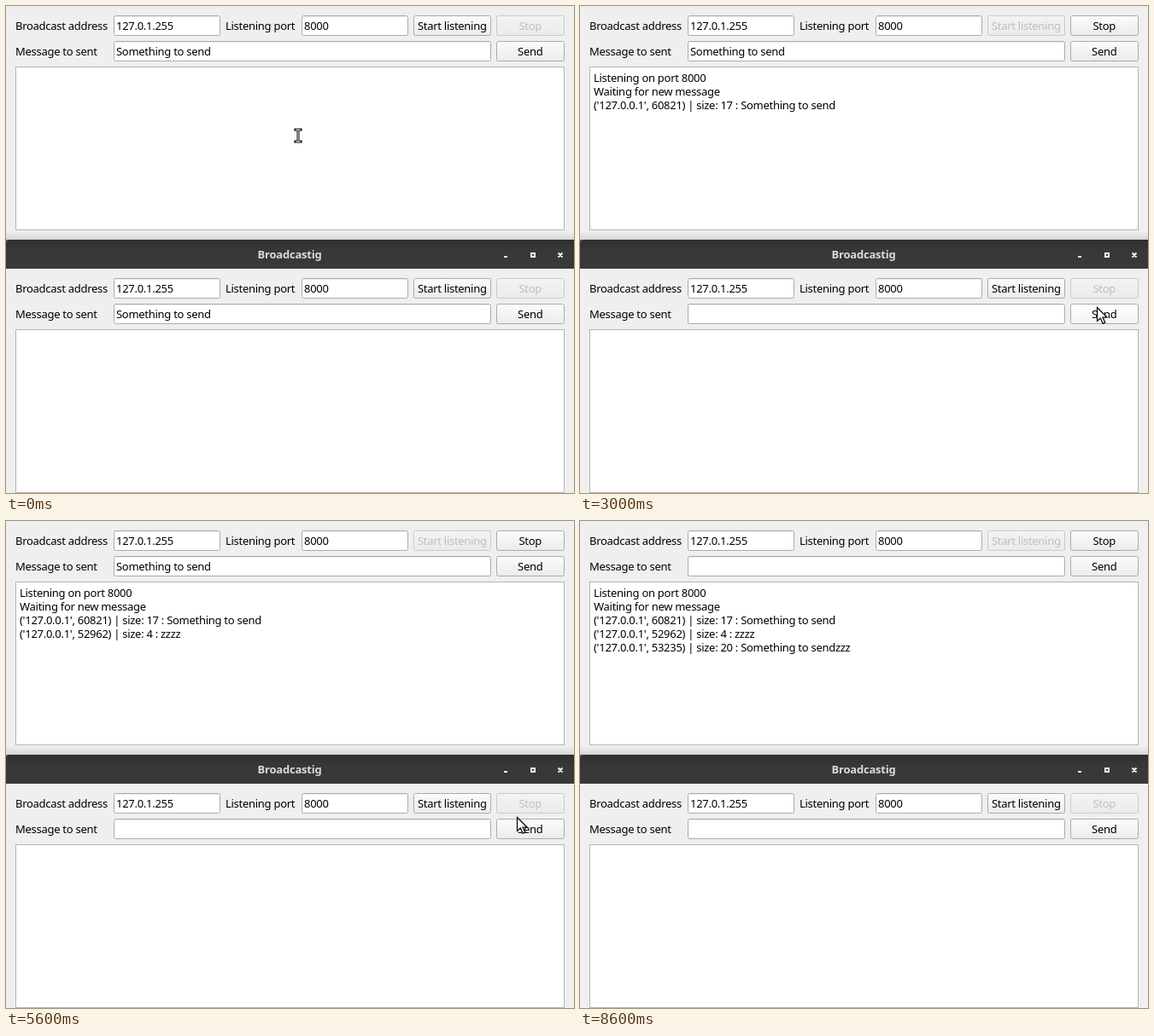
Animation of 665 by 571 pixels, one loop 8800 ms. Source, as an HTML page:

```html
<!DOCTYPE html>
<html lang="en">
<head>
<meta charset="utf-8">
<title>Broadcastig</title>
<style>
html, body { margin: 0; width: 100%; height: 100%; overflow: hidden; background: #efefef; }
svg { display: block; }
text { font: 13px "Noto Sans", "Open Sans", sans-serif; letter-spacing: -.28px; fill: #000; }
.mid { text-anchor: middle; }
.box { fill: #fff; stroke: #ababab; }
.area { stroke: #b5b5b5; }
.inset { stroke: #ececec; }
.focus .box { stroke: #266f9e; }
.focus .inset { stroke: #d4e6f1; }
.caret { visibility: hidden; }
.focus .caret { visibility: visible; }
.button rect { fill: url(#face); stroke: #ababab; }
.hover rect { fill: url(#light); }
.down rect { fill: #d9d9d9; }
.off rect { fill: url(#dull); stroke: #cbcbcb; }
.off text { fill: #bebebe; }
.title { font-weight: 600; fill: #dadada; letter-spacing: -.2px; }
.idle .title { fill: #d0d4d5; }
.idle .shade { opacity: .6; }
</style>
</head>
<body>
<svg width="665" height="571" viewBox="0 0 665 571">
  <defs>
    <linearGradient id="face" x2="0" y2="1">
      <stop stop-color="#fcfcfc"/><stop offset="1" stop-color="#ebebeb"/>
    </linearGradient>
    <linearGradient id="light" x2="0" y2="1">
      <stop stop-color="#fff"/><stop offset="1" stop-color="#f3f3f3"/>
    </linearGradient>
    <linearGradient id="dull" x2="0" y2="1">
      <stop stop-color="#f3f3f3"/><stop offset="1" stop-color="#ebebeb"/>
    </linearGradient>
    <linearGradient id="fade" x2="0" y2="1">
      <stop stop-color="#000" stop-opacity="0"/><stop offset="1" stop-color="#000" stop-opacity=".12"/>
    </linearGradient>
    <linearGradient id="metal" x2="0" y2="1">
      <stop stop-color="#303030"/><stop offset=".4" stop-color="#383838"/>
    </linearGradient>
  </defs>
  <rect width="665" height="571" fill="#efefef"/>
  <g id="top"></g>
  <g id="bar">
    <rect class="shade" y="264" width="665" height="11" fill="url(#fade)"/>
    <rect y="274" width="6" height="6" fill="#6b6b6b"/>
    <path d="M0 308V279Q0 274 5 274H665V308Z" fill="url(#metal)"/>
    <text class="title mid" x="332" y="296">Broadcastig</text>
    <path d="M583 294H587M615 290H619V294H615ZM646.5 289.5L651.5 294.5M651.5 289.5L646.5 294.5"
      fill="none" stroke="#f2f2f2" stroke-width="2"/>
  </g>
  <g id="bottom" transform="translate(0 308)"></g>
  <path id="arrow" d="M.5 .5V16.5L4.3 13L7.2 19.3L9.8 18.1L7 12H12Z" fill="#fff" stroke="#000" stroke-width="1.2"/>
  <g id="beam" fill="none">
    <path d="M-3 -7H3M0 -7V7M-3 7H3" stroke="#000" stroke-width="3" stroke-linecap="square"/>
    <path d="M-3 -7H3M0 -7V7M-3 7H3" stroke="#fff"/>
  </g>
</svg>
<script>
const LOOP = 8800, STEP = 100, FIRST = "Something to send";
const $ = id => document.getElementById(id);

// Both rows of controls share one height and text baseline.
const rowTop = row => 11 + 30 * row;
const label = (x, y, s) => `<text x="${x}" y="${y}">${s}</text>`;
const caption = (x, row, s) => label(x, rowTop(row) + 17, s);
const frame = (x, row, w, name = "") =>
  `<rect class="${name}" x="${x + .5}" y="${rowTop(row) + .5}" width="${w - 1}" height="23" rx="2"/>`;
const field = (x, row, w, s, name = "") => `<g class="${name}">
  ${frame(x, row, w, "box")}
  <path class="inset" d="M${x + 2} ${rowTop(row) + 1.5}h${w - 4}"/>
  ${caption(x + 3, row, s)}
  <rect class="caret" y="${rowTop(row) + 4}" width="1" height="16"/></g>`;
const button = (x, row, w, s, name) => `<g class="button ${name}">
  ${frame(x, row, w)}
  <text class="mid" x="${x + w / 2 - .2}" y="${rowTop(row) + 17}">${s}</text></g>`;

function makeWindow(id) {
  const root = $(id);
  root.innerHTML =
    caption(11, 0, "Broadcast address") + field(126, 0, 125, "127.0.1.255") +
    caption(257, 0, "Listening port") + field(346, 0, 125, "8000") +
    button(477, 0, 91, "Start listening", "start") + button(574, 0, 80, "Stop", "stop") +
    caption(11, 1, "Message to sent") + field(126, 1, 442, "", "message") +
    button(574, 1, 80, "Send", "send") +
    `<rect class="box area" x="11.5" y="71.5" width="642" height="191"/><g class="log"></g>`;
  const part = name => root.querySelector(name);
  return {
    start: part(".start"), stop: part(".stop"), send: part(".send"), log: part(".log"),
    message: part(".message"), text: part(".message text"), caret: part(".message .caret")
  };
}

const upper = makeWindow("top"), lower = makeWindow("bottom");
const editable = [...document.querySelectorAll(".box")];

const smooth = k => k * k * (3 - 2 * k);
const settle = k => 1 - (1 - k) ** 1.5;

// Each move glides from the last spot to a new one, bowed sideways by an arc.
const moves = [
  { from: 200, to: 1100, spot: [535, 20] },
  { from: 1600, to: 2400, spot: [605, 353], bow: [-33, 0], ease: settle },
  { from: 3100, to: 3600, spot: [434, 357] },
  { from: 3700, to: 3900, spot: [457, 370] },
  { from: 4100, to: 4600, spot: [573, 362], bow: [0, 14] },
  { from: 4700, to: 5300, spot: [602, 364] },
  { from: 5500, to: 6200, spot: [537, 52] },
  { from: 6400, to: 6800, spot: [614, 55] },
  { from: 7500, to: 8200, spot: [605, -30] }
];

function pointer(t) {
  let at = [342, 152];
  for (const { from, to, spot, bow = [0, 0], ease = smooth } of moves) {
    if (t <= from) break;
    const k = ease(Math.min(1, (t - from) / (to - from)));
    at = at.map((v, i) => Math.round(v + (spot[i] - v) * k + bow[i] * 4 * k * (1 - k)));
  }
  return at;
}

const within = (t, a, b) => t >= a && t < b;
const typed = (t, start, gap, count) =>
  "z".repeat(Math.max(0, Math.min(count, Math.floor((t - start) / gap) + 1)));
const received = (port, s) => `('127.0.0.1', ${port}) | size: ${s.length} : ${s}`;

const log = [
  { at: 1300, line: "Listening on port 8000" },
  { at: 1300, line: "Waiting for new message" },
  { at: 2900, line: received(60821, FIRST) },
  { at: 5000, line: received(52962, "zzzz") },
  { at: 7700, line: received(53235, FIRST + "zzz") }
];

function hit(el, x, y) {
  const r = el.getBoundingClientRect();
  return within(x, r.left, r.right) && within(y, r.top, r.bottom);
}

function setMessage(win, text, focus) {
  win.text.textContent = text;
  win.message.classList.toggle("focus", focus);
  const width = text ? win.text.getComputedTextLength() : 0;
  win.caret.setAttribute("x", Math.round(129 + width));
}

function draw(t) {
  const [x, y] = pointer(t), listening = t >= 1300;
  const setButton = (el, off, down) => {
    el.classList.toggle("off", off);
    el.classList.toggle("hover", hit(el.firstElementChild, x, y));
    el.classList.toggle("down", down);
  };

  setButton(upper.start, listening, within(t, 1200, 1300));
  setButton(upper.stop, !listening, false);
  setButton(upper.send, false, within(t, 7600, 7700));
  setButton(lower.start, false, false);
  setButton(lower.stop, true, false);
  setButton(lower.send, false, within(t, 2800, 2900) || within(t, 4900, 5000));

  setMessage(upper, t < 7700 ? FIRST + typed(t, 6800, 200, 3) : "", within(t, 6500, 7600));
  setMessage(lower, t < 2900 ? FIRST : t < 5000 ? typed(t, 4200, 100, 4) : "", within(t, 3600, 4900));

  upper.log.innerHTML = log.filter(e => t >= e.at)
    .map((e, i) => label(16, 89 + 16 * i, e.line)).join("");
  $("bar").classList.toggle("idle", within(t, 1200, 2800) || within(t, 6500, 8600));

  const active = editable.some(el => hit(el, x, y)) ? "beam" : "arrow";
  for (const id of ["arrow", "beam"]) {
    $(id).setAttribute("transform", `translate(${x} ${y})`);
    $(id).setAttribute("visibility", id === active ? "visible" : "hidden");
  }
}

let shown = -1;
const began = performance.now();
function tick() {
  const t = Math.floor((performance.now() - began) % LOOP / STEP) * STEP;
  if (t !== shown) draw(shown = t);
  requestAnimationFrame(tick);
}
tick();
</script>
</body>
</html>
```
